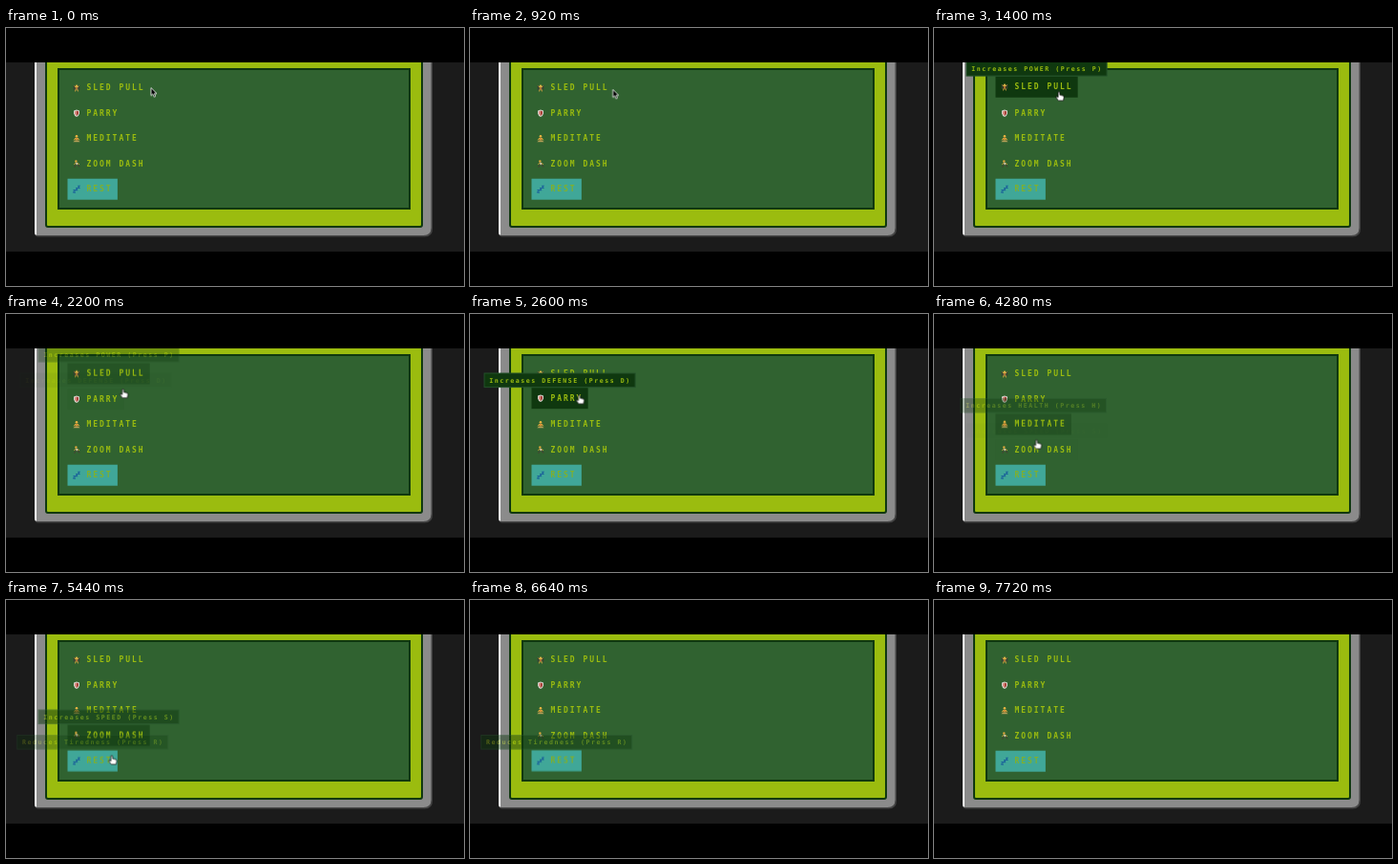
These frames come from a looping animation (480 px wide and 270 px high, 8.52 s). An HTML page:

```html
<!DOCTYPE html>
<html lang="en">
<head>
<meta charset="utf-8">
<title>Training menu</title>
<style>
  html, body { margin: 0; width: 100%; height: 100%; overflow: hidden; background: #000; }
  svg { display: block; width: 100vw; height: 100vh; }
  text { font-family: "DejaVu Sans Mono", "Liberation Mono", monospace; font-weight: bold; fill: #9bbc0f; white-space: pre; }
  .label { font-size: 8px; letter-spacing: 1.94px; }
  .tip text { font-size: 6.6px; letter-spacing: 1.53px; }
  .tip, .glow, #hand { opacity: 0; }
</style>
</head>
<body>
<svg viewBox="0 0 480 270" xmlns="http://www.w3.org/2000/svg">
  <defs>
    <clipPath id="view"><rect y="36" width="480" height="198"/></clipPath>
    <g id="lift">
      <path d="M-2.6-2.6V2M2.6-2.6V2" stroke="#3b3f35" stroke-width="1.2"/>
      <path d="M-2.4-2 0 0 2.4-2" fill="none" stroke="#dba63c" stroke-width="1"/>
      <circle cy="-1.9" r="1.2" fill="#e8b64a"/>
      <path d="M-1.2-.4H1.2V1.6H-1.2Z" fill="#b5673c"/>
      <path d="M-.8 1.4-1.4 3.7M.8 1.4 1.4 3.7" stroke="#d9a441" stroke-width="1"/>
    </g>
    <g id="shield">
      <path d="M0-3.7 3-2.8V.4Q2.6 2.8 0 3.8Q-2.6 2.8-3 .4V-2.8Z" fill="#d5d6cf"/>
      <path d="M0-2.6 2-2V.3Q1.8 1.8 0 2.7Z" fill="#a8433a"/>
      <path d="M0-2.6-2-2V.3Q-1.8 1.8 0 2.7Z" fill="#d98b80"/>
    </g>
    <g id="sit">
      <circle cy="-2.4" r="1.3" fill="#eab541"/>
      <path d="M-1.2-1H1.2L1.8 1.8H-1.8Z" fill="#d7913a"/>
      <path d="M-1.3-.6-2.8 1.7M1.3-.6 2.8 1.7" stroke="#eab541" stroke-width=".9"/>
      <path d="M-3.6 3.5Q-3 1.7 0 2Q3 1.7 3.6 3.5Z" fill="#b9a25a"/>
    </g>
    <g id="run">
      <circle cx="-.6" cy="-2.7" r="1.2" fill="#dba63c"/>
      <path d="M-.9-1.5 1-1.2 1.2 1H-.6Z" fill="#cfc7ae"/>
      <path d="M-.7-1-2.7.4M1-.8 2.8.5" stroke="#dba63c" stroke-width=".9"/>
      <path d="M-.2.8-1.7 2-2.2 3.6M.9.8 1.9 2.3 3.3 3" fill="none" stroke="#4a3a32" stroke-width="1"/>
    </g>
    <g id="sleep" fill="none" stroke="#15599a" stroke-width="1">
      <path d="M-3.6 1H-1.2L-3.6 3.4H-1"/>
      <path d="M-1-1H1L-1 1H1.2"/>
      <path d="M1.2-3.4H3.4L1.2-1.3H3.6"/>
    </g>
  </defs>

  <g clip-path="url(#view)">
    <rect y="36" width="480" height="198" fill="#1b1b1b"/>
    <path d="M30 20H447V210Q447 218.500 438.500 218.500H34Q30 218.500 30 214Z" fill="#454545"/>
    <path d="M30 20H445.500V209Q445.500 217 437.500 217H33Q30 217 30 214Z" fill="#8b8b8b"/>
    <path d="M30 20H32V216.500Q30 216.500 30 214Z" fill="#fff"/>
    <rect x="42" y="20" width="394" height="188" rx="2" fill="#9bbc0f" stroke="#0f380f" stroke-width="2"/>
    <rect x="55" y="43" width="368" height="146" fill="#306230" stroke="#0f380f" stroke-width="2"/>
    <g id="items"></g>
    <g id="tips"></g>
    <g id="cursor">
      <path id="arrow" d="M0 0V8.300L1.900 6.600 3.200 9.600 4.700 9 3.400 6.100H6Z" fill="#000" stroke="#fff" stroke-width=".8"/>
      <path id="hand" d="M-.9.700Q0-.600.900.700V3.500L4.200 4.200Q5.400 4.600 5.200 6L4.600 9.400H-.6L-3 6.200Q-3.300 4.900-2.100 5.200L-.9 6.100Z" fill="#fff" stroke="#000" stroke-width=".7"/>
    </g>
  </g>
</svg>

<script>
const LOOP = 8520, FADE = 300, ROW = 26.5, CELL = 6.75, TIP_CELL = 5.5;

// label, icon, hint, pointer enters, pointer leaves
const rows = [
  ['SLED PULL', 'lift', 'Increases POWER (Press P)', 960, 2080],
  ['PARRY', 'shield', 'Increases DEFENSE (Press D)', 2180, 2990],
  ['MEDITATE', 'sit', 'Increases HEALTH (Press H)', 3110, 4165],
  ['ZOOM DASH', 'run', 'Increases SPEED (Press S)', 4270, 5355],
  ['REST', 'sleep', 'Reduces Tiredness (Press R)', 5380, 6545]
];

// time, x, y of the pointer tip
const path = [
  [0, 152, 62.5], [520, 152, 62.5], [960, 149.5, 64.5], [1400, 131, 66.5],
  [1600, 129, 67], [1960, 129, 67], [2080, 126, 73], [2180, 123, 78],
  [2600, 114.5, 84.5], [2760, 114, 85], [2840, 114, 85], [2990, 112.5, 100],
  [3110, 111.5, 105], [3560, 109, 114], [4080, 109, 114], [4165, 108.5, 126],
  [4280, 107.5, 131.5], [4600, 107, 141], [5200, 107, 141], [5355, 110, 153],
  [5380, 110.3, 157.5], [5440, 110.8, 162.5], [5800, 112, 166], [6200, 112, 166],
  [6400, 101, 168], [6545, 64, 173], [6620, 0, 181], [6640, -20, 184], [LOOP, -20, 184]
];

const byId = id => document.getElementById(id);

function add(parent, tag, attrs, content) {
  const el = document.createElementNS('http://www.w3.org/2000/svg', tag);
  for (const key in attrs) el.setAttribute(key, attrs[key]);
  if (content) el.textContent = content;
  parent.append(el);
  return el;
}

function play(el, frames) {
  const anim = el.animate(frames, { duration: LOOP, iterations: Infinity });
  anim.startTime = 0;
}

// ease from one style to another while the row is hovered
function hover(el, start, end, prop, off, on) {
  const at = (time, value) => ({ offset: time / LOOP, [prop]: value, easing: 'ease' });
  play(el, [at(0, off), at(start, off), at(start + FADE, on), at(end, on), at(end + FADE, off), at(LOOP, off)]);
}

rows.forEach(([label, icon, hint, start, end], i) => {
  const mid = 62.7 + i * ROW;
  const width = 25.4 + label.length * CELL;
  const box = { x: 64.5, y: mid - 11, width, height: 22 };
  const rest = icon === 'sleep';

  const item = add(byId('items'), 'g', {});
  if (rest) add(item, 'rect', { ...box, fill: '#40a798' });
  else hover(add(item, 'rect', { ...box, class: 'glow', fill: '#0f380f' }), start, end, 'opacity', 0, 1);
  add(item, 'use', { href: '#' + icon, x: 74, y: mid });
  const text = add(item, 'text', { class: 'label', x: 84.6, y: mid + 2.7 }, label);
  if (rest) text.style.fill = '#80b02c';
  hover(item, start, end, 'transform', 'translateY(0px)', 'translateY(-1px)');

  const tipWidth = hint.length * TIP_CELL + 10.6;
  const left = 64.5 + (width - tipWidth) / 2;
  const tip = add(byId('tips'), 'g', { class: 'tip' });
  add(tip, 'rect', {
    x: left + .5, y: mid - 27.2, width: tipWidth - 1, height: 14.6,
    fill: '#0f380f', stroke: '#24502a'
  });
  add(tip, 'text', { x: left + 5.8, y: mid - 17.4 }, hint);
  hover(tip, start, end, 'opacity', 0, 1);
});

play(byId('cursor'), path.map(([time, x, y]) => ({
  offset: time / LOOP, transform: `translate(${x}px, ${y}px)`
})));

// arrow outside the rows, hand inside
function swap(el, outside, inside) {
  const at = (time, opacity) => ({ offset: time / LOOP, opacity, easing: 'steps(1, end)' });
  const turns = rows.flatMap(([, , , start, end]) => [at(start, inside), at(end, outside)]);
  play(el, [at(0, outside), ...turns, at(LOOP, outside)]);
}
swap(byId('arrow'), 1, 0);
swap(byId('hand'), 0, 1);
</script>
</body>
</html>
```
